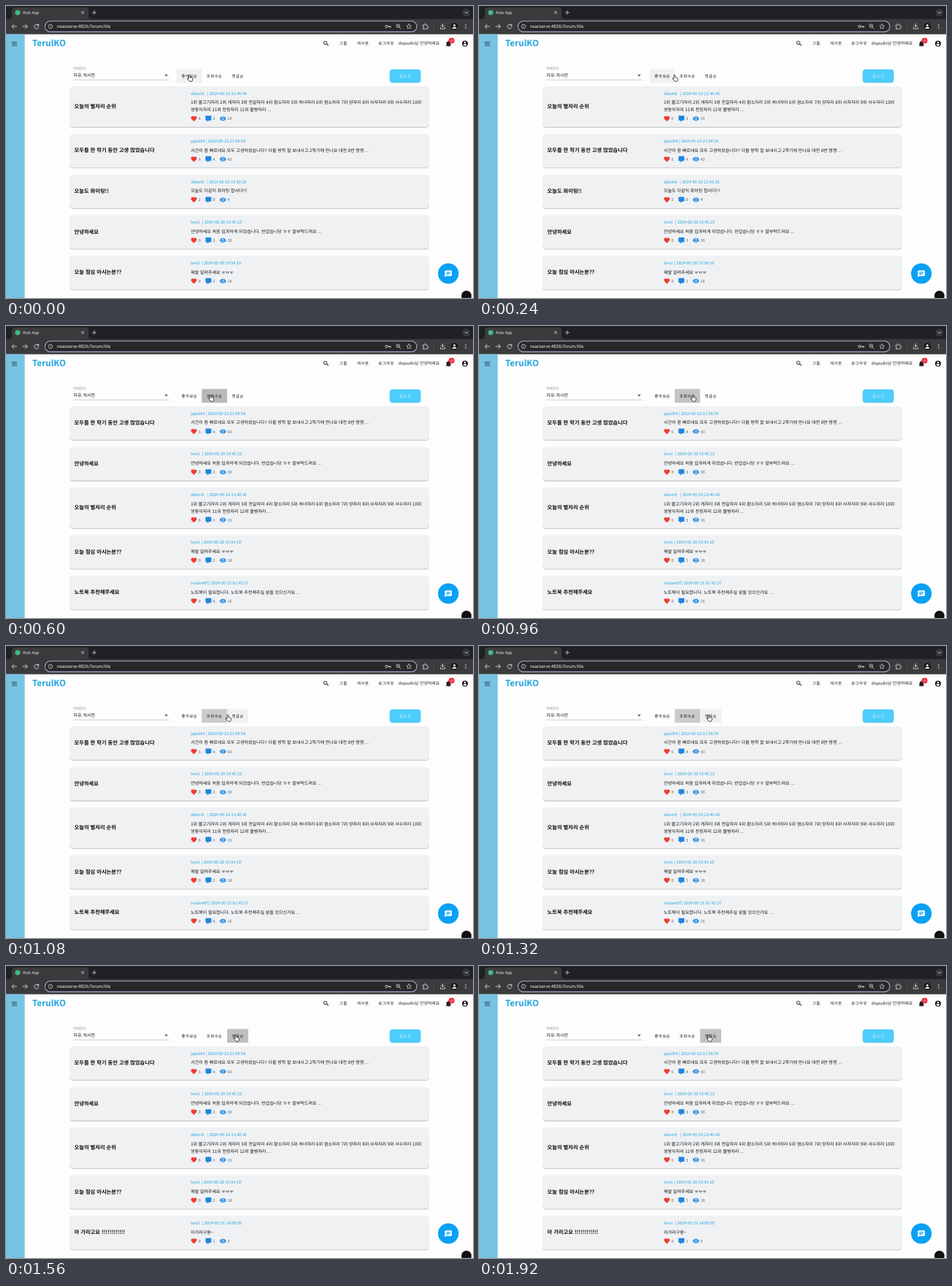
Recreate the animation shown at these times as an HTML page. Size 640 px wide and 400 px high, loop 2040 ms.

```html
<!DOCTYPE html>
<html lang="ko">
<head>
<meta charset="utf-8">
<title>Board</title>
<style>
  html, body { margin: 0; width: 100%; height: 100%; overflow: hidden; background: #fdfdfd; }
  svg { display: block; width: 640px; height: 400px; }
  text { font-family: "Noto Sans CJK KR", "Noto Sans CJK", "Noto Sans", sans-serif; text-rendering: geometricPrecision; white-space: pre; }
  .ui { font-family: Roboto, "Open Sans", sans-serif; }
  .sp { letter-spacing: .48px; font-weight: 500; }
</style>
</head>
<body>
<svg id="stage" viewBox="0 0 640 400" xmlns="http://www.w3.org/2000/svg"></svg>
<script>
const STEP = 120, LOOP = 2040;
const BLUE = '#1ea5e2';

const ICONS = {
  heart: 'M12 21.4C5.4 15.4 2 12.3 2 8.5 2 5.4 4.4 3 7.5 3c1.7 0 3.4.8 4.5 2.1C13.1 3.8 14.8 3 16.5 3 19.6 3 22 5.4 22 8.5c0 3.8-3.4 6.9-10 12.9z',
  comment: 'M9 22a1 1 0 0 1-1-1v-3H4a2 2 0 0 1-2-2V4a2 2 0 0 1 2-2h16a2 2 0 0 1 2 2v12a2 2 0 0 1-2 2h-6.1l-3.7 3.7z',
  eye: 'M12 9a3 3 0 1 0 0 6 3 3 0 0 0 0-6m0 8a5 5 0 1 1 0-10 5 5 0 0 1 0 10m0-12.5C7 4.5 2.7 7.6 1 12c1.7 4.4 6 7.5 11 7.5s9.3-3.1 11-7.5C21.3 7.6 17 4.5 12 4.5',
  search: 'M9.5 3a6.5 6.5 0 0 1 4.9 10.7l.3.3h.8l5 5-1.5 1.5-5-5v-.8l-.3-.3A6.5 6.5 0 1 1 9.5 3m0 2a4.5 4.5 0 1 0 0 9 4.5 4.5 0 0 0 0-9',
  bell: 'M21 19v1H3v-1l2-2v-6c0-3.1 2-5.8 5-6.7V4a2 2 0 0 1 4 0v.3c3 .9 5 3.6 5 6.7v6zm-7 2a2 2 0 0 1-4 0',
  account: 'M12 2a10 10 0 1 0 0 20 10 10 0 0 0 0-20m0 3a3 3 0 1 1 0 6 3 3 0 0 1 0-6m0 14.2a7.2 7.2 0 0 1-6-3.2c0-2 4-3.1 6-3.1s6 1.1 6 3.1a7.2 7.2 0 0 1-6 3.2',
  chat: 'M20 2H4a2 2 0 0 0-2 2v18l4-4h14a2 2 0 0 0 2-2V4a2 2 0 0 0-2-2M6 6h12v2H6zm8 8H6v-2h8zm4-3H6V9h12z'
};

const POSTS = {
  stars: { title: '오늘의 별자리 순위', user: 'ddumli', date: '2024-05-23 21:46:46', end: 330, n: [6, 3, 19], body: [
    '1위 물고기자리 2위 게자리 3위 전갈자리 4위 황소자리 5위 처녀자리 6위 염소자리 7위 양자리 8위 사자자리 9위 사수자리 10위',
    '쌍둥이자리 11위 천칭자리 12위 물병자리 ...'] },
  term: { title: '모두들 한 학기 동안 고생 많았습니다', user: 'ppe204', date: '2024-05-23 21:58:54', end: 328, n: [6, 4, 43],
    body: ['시간이 참 빠르네요 모두 고생하셨습니다!! 다들 방학 잘 보내시고 2학기에 만나요 대전 8반 짱짱 ...'] },
  cheer: { title: '오늘도 화이팅!!', user: 'ddumli', date: '2024-05-23 21:43:25', end: 329.5, n: [2, 0, 4],
    body: ['오늘도 다같이 화이팅 합시다!!!'] },
  hello: { title: '안녕하세요', user: 'terul', date: '2024-05-20 16:45:23', end: 323, n: [0, 3, 30],
    body: ['안녕하세요 처음 입과하게 되었습니다. 반갑습니당 ㅎㅎ 잘부탁드려요 ...'] },
  lunch: { title: '오늘 점심 아시는분??', user: 'terul', date: '2024-05-20 16:54:10', end: 322, n: [0, 2, 18],
    body: ['제발 알려주세요 ㅠㅠㅠ'] },
  laptop: { title: '노트북 추천해주세요', user: 'nodam07', date: '2024-05-21 01:42:27', end: 332, n: [0, 0, 15],
    body: ['노트북이 필요합니다. 노트북 추천해주실 분들 있으신가요 ...'] },
  go: { title: '아 가라고요 !!!!!!!!!!!!', user: 'terul', date: '2024-05-21 14:00:05', end: 323, n: [0, 1, 5],
    body: ['아가라구용~'] }
};
const ORDERS = [
  ['stars', 'term', 'cheer', 'hello', 'lunch'],
  ['term', 'hello', 'stars', 'lunch', 'laptop'],
  ['term', 'hello', 'stars', 'lunch', 'go']
];
const TABS = [
  { x: 234, w: 34.3, label: '좋아요순' },
  { x: 268.3, w: 34.7, label: '조회수순' },
  { x: 303, w: 29, label: '댓글순' }
];

// from step, cursor x, list, tab fills, rippling tab
const NONE = 'none', HOVER = '#f1f1f1';
const POSES = [
  [0, 251.4, 0, [HOVER, NONE, NONE], -1],
  [1, 255, 0, [HOVER, NONE, NONE], -1],
  [2, 268, 0, [HOVER, NONE, NONE], -1],
  [3, 279, 0, [NONE, HOVER, NONE], -1],
  [4, 280.3, 0, [NONE, HOVER, NONE], 1],
  [5, 280.3, 1, [NONE, '#b7bab8', NONE], -1],
  [8, 293, 1, [NONE, '#c2c3c3', NONE], -1],
  [9, 304, 1, [NONE, '#c9cbcd', HOVER], -1],
  [10, 313, 1, [NONE, '#c9cbcd', HOVER], -1],
  [11, 315, 1, [NONE, '#c9cbcd', HOVER], -1],
  [12, 315, 1, [NONE, '#c9cbcd', HOVER], 2],
  [13, 315, 2, [NONE, NONE, '#bfc0c0'], -1],
  [14, 315, 2, [NONE, NONE, '#c2c3c3'], -1]
];

const rect = (x, y, w, h, fill, r = 0, more = '') =>
  `<rect x="${x}" y="${y}" width="${w}" height="${h}" rx="${r}" fill="${fill}" ${more}/>`;
const dot = (x, y, r, fill, more = '') => `<circle cx="${x}" cy="${y}" r="${r}" fill="${fill}" ${more}/>`;
const line = (d, color, w = 1) =>
  `<path d="${d}" fill="none" stroke="${color}" stroke-width="${w}" stroke-linecap="round" stroke-linejoin="round"/>`;
const text = (s, x, y, size, fill = '#111', more = '') =>
  `<text x="${x}" y="${y}" font-size="${size}" fill="${fill}" ${more}>${s}</text>`;
const icon = (name, x, y, size, fill) =>
  `<path transform="translate(${x - size / 2} ${y - size / 2}) scale(${size / 24})" d="${ICONS[name]}" fill="${fill}" fill-rule="evenodd"/>`;

function browser() {
  const c = '#d5d6d8';
  let s = rect(0, 0, 640, 18, '#202124');
  s += '<path d="M4 18q4 0 4-4V6q0-4 4-4h97q4 0 4 4v8q0 4 4 4z" fill="#3b3b3d"/>';
  s += rect(0, 17.8, 640, 20.9, '#3b3b3d');
  s += dot(16, 9, 3.5, '#41b883');
  s += text('Rulo App', 23.3, 11.2, 5.5, '#e4e5e7', 'class="ui"');
  s += line('M103.5 7.3l3.4 3.4m0-3.4l-3.4 3.4', c, .8) + line('M118.5 9h5m-2.5-2.5v5', c, .8);
  s += dot(631, 9, 5.5, '#38393c') + line('M629.2 8.3l1.8 1.7 1.8-1.7', c, .9);
  s += line('M14.5 28h-6.3m2.8-2.8L8.2 28l2.8 2.8', c, .9);
  s += line('M23 28h6.3m-2.8-2.8l2.8 2.8-2.8 2.8', c, .9);
  s += line('M44.3 26.3a3 3 0 1 0 .6 2.4M44.8 24.6v2.2h-2.2', c, .9);
  s += rect(53.5, 20.8, 509.5, 14.6, '#28282b', 7.3, 'stroke="#a3a8cc" stroke-width="1.1"');
  s += dot(61, 28, 2.9, 'none', `stroke="${c}" stroke-width=".7"`) + line('M61 27.7v1.7M61 26.4v.1', c, .7);
  s += text('nearserve:4826/forum/tile', 70, 30.2, 6.25, '#e8eaed', 'class="ui"');
  s += dot(521.5, 28, 1.7, 'none', `stroke="${c}" stroke-width=".9"`) + line('M523.3 28h4v1.4m-1.5-1.4v1.1', c, .9);
  s += dot(537.3, 27.2, 2.3, 'none', `stroke="${c}" stroke-width=".8"`) + line('M539 29l2 2m-4.7-3.8h2', c, .8);
  s += line('M552.3 24.6l1 2.2 2.4.3-1.8 1.6.5 2.4-2.1-1.2-2.1 1.2.5-2.4-1.8-1.6 2.4-.3z', c, .7);
  s += line('M571.5 26h1.8q-.2-1.6 1-1.6t1 1.6h2v1.9q1.5-.1 1.5 1t-1.5 1v1.6h-5.8v-1.7q1.3 0 1.3-1t-1.3-1z', c, .8);
  s += line('M586.5 24.5v7', '#56575a', .7);
  s += line('M598.5 24.4v4.4m-2-2l2 2 2-2m-5 2.8v1.6h6v-1.6', c, .9);
  s += dot(614.5, 28, 4.8, '#18191b') + dot(614.5, 26.6, 1.5, '#f1f1f1') + '<path d="M611.6 31q0-2.3 2.9-2.3t2.9 2.3z" fill="#f1f1f1"/>';
  for (const y of [25.5, 28, 30.5]) s += dot(630, y, .75, c);
  return s;
}

function header() {
  let s = rect(0, 38.7, 25.7, 361.3, '#77c3e2');
  for (const y of [49, 51.3, 53.6]) s += rect(7.8, y, 7.2, .9, '#24404d');
  s += text('TerulKO', 36, 55.2, 11.7, BLUE, 'font-weight="700"');
  s += icon('search', 438.8, 51.3, 9.6, '#1c1c1c');
  s += text('그룹', 456.7, 53.3, 5.4, '#111', 'class="sp"');
  s += text('게시판', 481, 53.3, 5.4, '#111', 'class="sp"');
  s += text('로그아웃', 510.2, 53.3, 5.4, '#111', 'class="sp"');
  s += text('dopudo님 안녕하세요', 538, 53.4, 5.95, '#222');
  s += icon('bell', 606.4, 51.6, 9.6, '#1c1c1c') + dot(610.6, 47.6, 4, '#f2303a');
  s += text('0', 610.6, 49.1, 4, '#fff', 'text-anchor="middle"');
  s += icon('account', 629, 51.5, 9.6, '#1c1c1c');
  return s;
}

function filters() {
  let s = text('카테고리', 92.3, 86.6, 4.5, '#777');
  s += text('자유 게시판', 92.3, 96.7, 6.15, '#222');
  s += rect(92, 100.8, 132, .6, '#aaa') + '<path d="M217.2 94.1h4.8l-2.4 2.4z" fill="#555"/>';
  TABS.forEach((t, i) => {
    s += `<clipPath id="clip${i}">${rect(t.x, 86.3, t.w, 18.9, '#000')}</clipPath>`;
    s += rect(t.x, 86.3, t.w, 18.9, NONE, 0, `id="tab${i}"`);
    s += dot(t.x + t.w / 2 - 2, 95.8, 16, '#a9a9a9', `id="ripple${i}" clip-path="url(#clip${i})"`);
    s += text(t.label, t.x + 6.5, 97.8, 5.4, '#111', 'class="sp"');
  });
  s += rect(525.8, 87.4, 42.6, 18.2, '#000', 4, 'opacity=".16"') + rect(525.8, 86.7, 42.6, 18.2, '#4ccdfb', 4);
  s += text('글쓰기', 539, 98, 5.4, '#d9f5ff', 'class="sp"');
  return s;
}

function card(p, top) {
  const two = p.body.length > 1, h = two ? 55.85 : 46.2;
  const y = top + (two ? 44.3 : 34.5);
  let s = rect(87, top + .8, 493, h, '#9da0a3', 5, 'opacity=".7"');
  s += rect(87, top, 493, h, '#eff1f3', 5);
  s += text(p.title, 93.6, top + h / 2 + 2, 7.24, '#0c0c0c', 'font-weight="700"');
  s += text(p.user, 253.2, top + 11.8, 5.5, BLUE);
  s += text('| ' + p.date, p.end, top + 11.8, 5.5, BLUE, 'text-anchor="end"');
  p.body.forEach((b, i) => s += text(b, 253.2, top + 24.4 + i * 9.8, 6.02, '#111', 'font-weight="500"'));
  ['heart', 'comment', 'eye'].forEach((name, i) => {
    const x = 257.5 + i * 19.9;
    s += icon(name, x, y, 9.6, i ? '#1e86e0' : '#ee3d32') + text(p.n[i], x + 6.2, y + 2, 5.4, '#666');
  });
  return { s, h };
}

function list(order, i) {
  let top = 110, s = '';
  for (const key of order) {
    const c = card(POSTS[key], top);
    s += c.s;
    top += c.h + 9.45;
  }
  return `<g id="list${i}">${s}</g>`;
}

const hand = '<path id="hand" d="M-.9.8a.9.9 0 0 1 1.8 0V3.3l2.6.5q1.2.3 1 1.6L4 7.6l-.6 1.2H.3L-2.6 5.6q-.5-1 .5-1.1l1.2.7z" fill="#fff" stroke="#111" stroke-width=".75" stroke-linejoin="round"/>';
const fab = dot(606.2, 366.5, 14.1, '#08a1f6') + icon('chat', 606.2, 367, 11.5, '#fff') + dot(631, 397, 7, '#111');

const $ = id => document.getElementById(id);
$('stage').innerHTML = rect(0, 0, 640, 400, '#fdfdfd') + browser() + header() + filters() +
  ORDERS.map(list).join('') + fab + hand;

function show([, x, listNo, fills, ripple]) {
  ORDERS.forEach((_, i) => $('list' + i).style.display = i === listNo ? '' : 'none');
  fills.forEach((fill, i) => {
    $('tab' + i).setAttribute('fill', fill);
    $('ripple' + i).style.display = i === ripple ? '' : 'none';
  });
  $('hand').setAttribute('transform', `translate(${x} 94.4)`);
}

let last;
const start = performance.now();
function tick(now) {
  const step = Math.floor((Math.max(0, now - start) % LOOP) / STEP);
  const pose = POSES.filter(p => p[0] <= step).pop();
  if (pose !== last) show(last = pose);
  requestAnimationFrame(tick);
}
tick(start);
</script>
</body>
</html>
```
